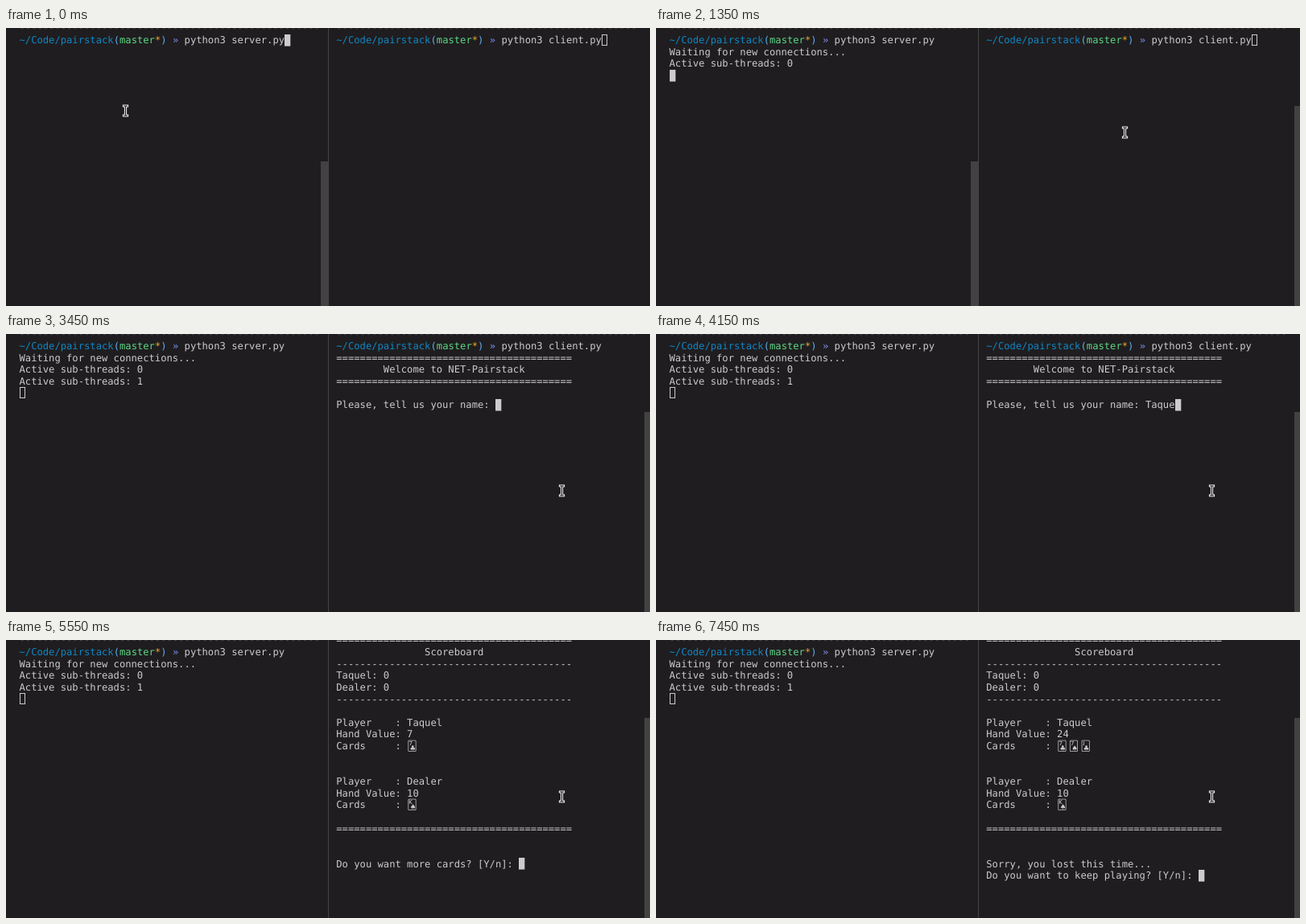
Write an HTML page with a canvas that moves like this. It is 800x346 px and loops after 8 s.

```html
<!DOCTYPE html>
<html lang="en">
<head>
<meta charset="utf-8">
<title>Card game in two terminals</title>
<style>
  html, body { margin: 0; width: 100%; height: 100%; overflow: hidden; background: #1f1d1f; }
  canvas { display: block; width: 800px; height: 346px; }
</style>
</head>
<body>
<canvas id="stage" width="800" height="346"></canvas>
<script>
const ctx = document.getElementById('stage').getContext('2d');
const LOOP = 8000, TICK = 50;
const CELL = 7.325, LINE = 14.64, TOP = 7.7, BASE = 19;
const LEFT = 16.5, RIGHT = 410.3;
const BG = '#1f1d1f', FG = '#cccccc', RULE = '#484648';
const MONO = '12.17px "DejaVu Sans Mono", monospace';
const CARD = '12.17px "DejaVu Sans", sans-serif';
const PLAYER = 'Taquel';
const KEY_TIMES = [3750, 3850, 4000, 4100, 4150, 4250];
const DOUBLE = '='.repeat(40), SINGLE = '-'.repeat(40);

const clamp = v => Math.min(1, Math.max(0, v));

function put(x0, row, text, col = 0, color = FG, font = MONO) {
  ctx.font = font;
  ctx.fillStyle = color;
  ctx.fillText(text, x0 + col * CELL, BASE + row * LINE);
}

function putLines(x0, row, lines) {
  lines.forEach((line, i) => put(x0, row + i, line));
}

function cursor(x0, row, col, solid) {
  const x = Math.round(x0 + col * CELL), y = Math.round(TOP + row * LINE);
  ctx.fillStyle = ctx.strokeStyle = FG;
  ctx.lineWidth = 1;
  if (solid) ctx.fillRect(x, y, 7.3, 14.6);
  else ctx.strokeRect(x + 0.5, y + 0.5, 6, 13);
}

function prompt(x0, command) {
  put(x0, -1, '-'.repeat(51), 0, RULE);
  const parts = [
    ['~/Code/pairstack', '#1187c4'], ['(', '#5fafef'], ['master', '#5fd787'],
    ['*', '#f0a52a'], [')', '#5fafef'], [' » ', '#7f8ff0'], [command, FG]
  ];
  let col = 0;
  for (const [text, color] of parts) {
    put(x0, 0, text, col, color);
    col += text.length;
  }
  return col;
}

function server(t, focused) {
  const end = prompt(LEFT, 'python3 server.py');
  if (t < 50) return cursor(LEFT, 0, end, focused);
  const lines = [];
  if (t >= 150) lines.push('Waiting for new connections...', 'Active sub-threads: 0');
  if (t >= 2450) lines.push('Active sub-threads: 1');
  putLines(LEFT, 1, lines);
  cursor(LEFT, 1 + lines.length, 0, focused);
}

function login(t, focused) {
  const end = prompt(RIGHT, 'python3 client.py');
  if (t < 2350) return cursor(RIGHT, 0, end, focused);
  if (t < 2450) return cursor(RIGHT, 1, 0, focused);
  const typed = PLAYER.slice(0, KEY_TIMES.filter(k => t >= k).length);
  const ask = 'Please, tell us your name: ' + typed;
  putLines(RIGHT, 1, [DOUBLE, ' '.repeat(8) + 'Welcome to NET-Pairstack', DOUBLE, '', ask]);
  cursor(RIGHT, 5, ask.length, focused);
}

function hand(row, name, value, cards) {
  putLines(RIGHT, row, ['Player    : ' + name, 'Hand Value: ' + value, 'Cards     :']);
  cards.forEach((c, i) => put(RIGHT, row + 2, c, 12 + 2 * i, FG, CARD));
}

function table(t) {
  const cards = t < 5850 ? 1 : t < 6350 ? 2 : 3;
  putLines(RIGHT, -1, [DOUBLE, ' '.repeat(15) + 'Scoreboard', SINGLE,
    PLAYER + ': 0', 'Dealer: 0', SINGLE]);
  hand(6, PLAYER, [7, 14, 24][cards - 1], ['🃗', '🂧', '🃛'].slice(0, cards));
  hand(11, 'Dealer', 10, ['🂮']);
  put(RIGHT, 15, DOUBLE);
  const ask = cards < 3
    ? ['Do you want more cards? [Y/n]: ']
    : ['Sorry, you lost this time...', 'Do you want to keep playing? [Y/n]: '];
  putLines(RIGHT, 18, ask);
  cursor(RIGHT, 17 + ask.length, ask[ask.length - 1].length, true);
}

function bar(x, y, w, alpha) {
  ctx.globalAlpha = alpha;
  ctx.fillStyle = '#434243';
  ctx.fillRect(x, y, w, 346 - y);
  ctx.globalAlpha = 1;
}

function pointer(t) {
  const s = clamp((t - 900) / 600) ** 1.5;
  const bend = (a, b, c) => (1 - s) ** 2 * a + 2 * s * (1 - s) * b + s * s * c;
  ctx.save();
  ctx.translate(Math.round(bend(148, 600, 690)) + 0.5, Math.round(bend(103, 78, 195)));
  for (const [color, width] of [['#f4f4f4', 3.2], ['#161416', 1.1]]) {
    ctx.strokeStyle = color;
    ctx.lineWidth = width;
    ctx.lineCap = 'square';
    ctx.beginPath();
    for (const y of [-6, 6]) {
      ctx.moveTo(-2, y);
      ctx.lineTo(2, y);
    }
    ctx.moveTo(0, -6);
    ctx.lineTo(0, 6);
    ctx.stroke();
  }
  ctx.restore();
}

function draw(now) {
  const t = Math.floor(now % LOOP / TICK) * TICK;
  const clientFocus = t >= 1550;
  ctx.textRendering = 'geometricPrecision';
  ctx.fillStyle = BG;
  ctx.fillRect(0, 0, 800, 346);
  server(t, !clientFocus);
  if (t < 4550) login(t, clientFocus);
  else table(t);
  bar(391, 166, 9, 1 - clamp((t - 1650) / 500));
  bar(793, 97, 7, clamp((t - 1150) / 100));
  ctx.fillStyle = '#454445';
  ctx.fillRect(400, 0, 1, 346);
  pointer(t);
}

const start = performance.now();
function frame() {
  draw(performance.now() - start);
  requestAnimationFrame(frame);
}
frame();
</script>
</body>
</html>
```
